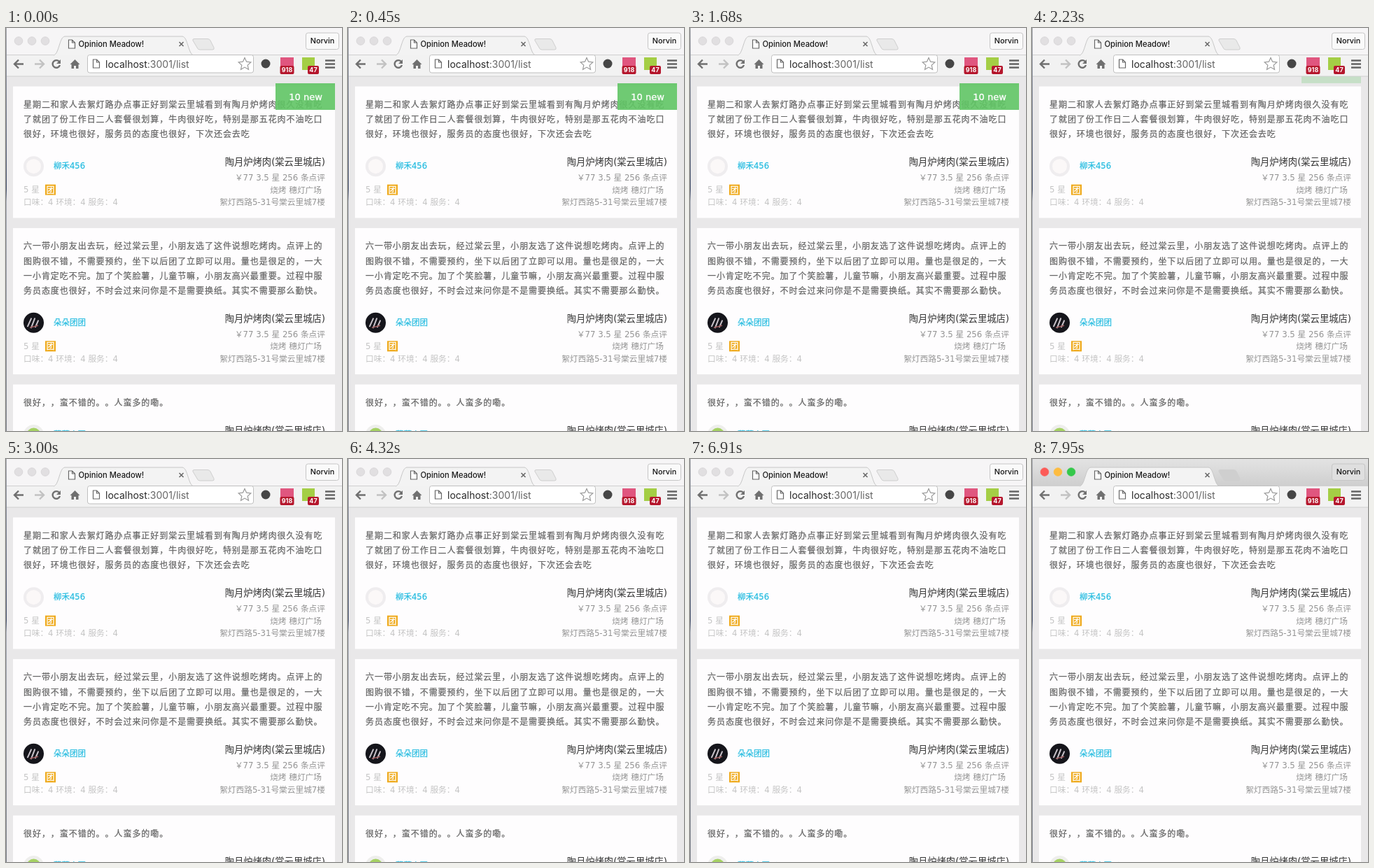
Recreate the animation shown at these times as an HTML page. Size 480 px wide and 576 px high, loop 8 s.

```html
<!DOCTYPE html>
<html lang="zh-CN">
<head>
<meta charset="utf-8">
<style>
  html, body { margin: 0; height: 100%; overflow: hidden; background: #e9e8e9; }
  svg { display: block; width: 100vw; height: 100vh; }
  text {
    font-family: 'DejaVu Sans', 'Noto Sans CJK SC', sans-serif; white-space: pre;
    font-feature-settings: 'chws' 0, 'halt' 0; text-spacing-trim: space-all;
  }
  .ui text { font-family: Inter, 'Liberation Sans', sans-serif; }
  .body { letter-spacing: .95px; stroke: #666; stroke-width: .25; }
  .user { stroke: #25bce0; stroke-width: .25; }
  .icon { fill: none; stroke: #707070; stroke-width: 2.4; }
</style>
</head>
<body>
<svg id="stage" viewBox="0 0 480 576"></svg>
<script>
const LOOP = 8000, SLIDE_START = 2090, SLIDE_TIME = 300, FOCUS_AT = 7900;
const SHOP = '陶月炉烤肉(棠云里城店)';
const ADDRESS = '絮灯西路5-31号棠云里城7楼';

const rect = (x, y, w, h, fill, extra = '') =>
  `<rect x="${x}" y="${y}" width="${w}" height="${h}" fill="${fill}" ${extra}/>`;
const circle = (x, y, r, fill, extra = '') =>
  `<circle cx="${x}" cy="${y}" r="${r}" fill="${fill}" ${extra}/>`;
const path = (d, extra) => `<path d="${d}" ${extra}/>`;
// Text is placed by the vertical centre of its line.
const text = (x, cy, size, fill, str, extra = '') =>
  `<text x="${x}" y="${cy + size * .37}" font-size="${size}" fill="${fill}" ${extra}>${str}</text>`;
const right = (x, cy, size, fill, str) => text(x, cy, size, fill, str, 'text-anchor="end"');

const avatars = {
  pale: y => circle(39.5, y, 14.5, '#efedef') + circle(39.5, y, 10.5, '#fbf8f8'),
  dark: y => circle(39.5, y, 14.5, '#15151b') +
    path(`M31 ${y + 5}l5-11M36 ${y + 7}l5-13M42 ${y + 6}l4-9`,
      'stroke="#c9c3ca" stroke-width="2" stroke-linecap="round"') +
    path(`M34 ${y + 7}l12-3`, 'stroke="#9a5557" stroke-width="1.5"'),
  green: y => circle(39.5, y, 14.5, '#eeeeec') + circle(39.5, y, 10, '#a5d163')
};

function card(top, height, lines, user, avatar) {
  const firstLine = top + 26, pitch = 21.1;
  const last = firstLine + (lines.length - 1) * pitch;
  return rect(10, top, 460, height, '#fefdfe') +
    lines.map((s, i) => text(25, firstLine + i * pitch, 12, '#666', s, 'class="body"')).join('') +
    avatars[avatar](last + 46) +
    text(68, last + 45.5, 11.5, '#25bce0', user, 'class="user"') +
    right(456, last + 39.5, 13.3, '#333', SHOP) +
    right(456, last + 62, 11.7, '#949494', '￥77 3.5 星 256 条点评') +
    right(451, last + 79.5, 11.7, '#949494', '烧烤 穗灯广场') +
    right(456, last + 97, 11.7, '#949494', ADDRESS) +
    text(25, last + 79, 11.7, '#c4c4c4', '5 星') +
    rect(56, last + 72, 15, 15, '#efaa1c') +
    text(57.5, last + 79.5, 12, '#fff', '团', 'stroke="#fff" stroke-width=".3"') +
    text(25, last + 97, 11.7, '#c4c4c4', '口味：4 环境：4 服务：4');
}

const cards =
  card(83.5, 188, [
    '星期二和家人去絮灯路办点事正好到棠云里城看到有陶月炉烤肉很久没有吃',
    '了就团了份工作日二人套餐很划算，牛肉很好吃，特别是那五花肉不油吃口',
    '很好，环境也很好，服务员的态度也很好，下次还会去吃'
  ], '柳禾456', 'pale') +
  card(286, 209, [
    '六一带小朋友出去玩，经过棠云里，小朋友选了这件说想吃烤肉。点评上的',
    '图购很不错，不需要预约，坐下以后团了立即可以用。量也是很足的，一大',
    '一小肯定吃不完。加了个笑脸薯，儿童节嘛，小朋友高兴最重要。过程中服',
    '务员态度也很好，不时会过来问你是不是需要换纸。其实不需要那么勤快。'
  ], '朵朵团团', 'dark') +
  card(509.5, 120, ['很好，，蛮不错的。。人蛮多的嘞。'], '蔓蔓小圆子', 'green');

const badge = `<g id="badge">${rect(385, 79, 85, 38, '#60c564')}
  ${text(428, 98, 13, '#fff', '10 new', 'text-anchor="middle" stroke="#fff" stroke-width=".3"')}</g>`;

const page = (x, y, w, h) =>
  path(`M${x} ${y}h${w - 4}l4 4v${h - 4}h${-w}zM${x + w - 4} ${y}v4h4`,
    'fill="#fff" stroke="#666" stroke-width="1.2"');
const counter = (x, w, n) => rect(x, 54, w, 12, '#b5172d', 'rx="2"') +
  text(x + w / 2, 60, 9, '#fff', n, 'text-anchor="middle" font-weight="700"');

const browser = `<g class="ui">
  <rect id="titlebar" width="480" height="39"/>
  ${rect(0, 38, 480, 31, '#f2f2f2')}
  ${path('M0 38.5H68M268 38.5H480', 'stroke="#d0d0d0"')}
  ${path('M0 69H480', 'stroke="#cfcfcf"')}
  ${path('M68 39C76 37 76 13 84 12H252C260 13 260 37 268 39', 'fill="#f3f3f3" stroke="#c6c6c6"')}
  <path id="newTab" d="M269 15.5H288Q291 15.5 292 18L297 28Q298 31 295 31H277Q274 31 273 28L267 18Q266 15.5 269 15.5Z" stroke="#cfcfcf"/>
  ${[18, 37, 56].map(x => circle(x, 18.5, 5.8, '', 'class="light" stroke-width=".8"')).join('')}
  ${page(89.5, 17, 9, 12)}
  ${text(103.5, 23, 11.2, '#1c1c1c', 'Opinion Meadow!', 'font-weight="500"')}
  ${path('M247.5 20l6 6M253.5 20l-6 6', 'stroke="#666" stroke-width="1.5"')}
  <rect id="profile" x="428.5" y="7" width="47" height="23.5" rx="3" stroke="#c6c6c6"/>
  ${text(452, 18.5, 10.8, '#111', 'Norvin', 'text-anchor="middle" font-weight="500"')}
  ${path('M25 51.5H12M18 45.5l-6 6 6 6', 'class="icon"')}
  ${path('M41 51.5H54M48 45.5l6 6-6 6', 'class="icon" style="stroke:#c2c2c2"')}
  ${path('M76 48A5.3 5.3 0 1 0 77 53', 'class="icon"')}
  ${path('M78 45v6h-6z', 'fill="#707070"')}
  ${path('M91.5 52L98.5 45l7 7h-2v6h-3.5v-4h-3v4h-3.5v-6z', 'fill="#707070"')}
  ${rect(116.5, 38.5, 237, 25.5, '#fff', 'rx="3" stroke="#bfbfbf"')}
  ${page(124.5, 45, 9, 12)}
  ${text(142, 51.5, 14, '#2a2a2a', 'localhost<tspan fill="#666">:3001/list</tspan>')}
  ${path('M341 42.5l2.6 5.7 6.2.7-4.6 4.2 1.3 6.1-5.5-3.1-5.5 3.1 1.3-6.1-4.6-4.2 6.2-.7z',
    'fill="#fff" stroke="#999" stroke-width="1.2"')}
  ${circle(371, 51, 6.5, '#464646')}
  ${rect(392, 42, 19, 19, '#e0567f')}${counter(391.5, 20, '918')}
  ${rect(423, 42, 18, 18, '#a4ce45')}${counter(431, 16, '47')}
  ${path('M456 46.5h14M456 51.5h14M456 56.5h14', 'stroke="#666" stroke-width="2.6"')}
</g>`;

const edge = `<linearGradient id="edge" x2="0" y2="1">
    <stop stop-color="#a5a7ad"/><stop offset=".4" stop-color="#3c4966"/>
    <stop offset=".43" stop-color="#a3a8b2"/><stop offset="1" stop-color="#777c86"/>
  </linearGradient>${rect(0, 0, 1, 576, 'url(#edge)')}
  <linearGradient id="activeBar" x2="0" y2="1">
    <stop stop-color="#e3e3e3"/><stop offset="1" stop-color="#cecece"/>
  </linearGradient>`;

const $ = id => document.getElementById(id);
$('stage').innerHTML = rect(0, 0, 480, 576, '#e9e8e9') + cards + badge + browser + edge;
const lights = document.querySelectorAll('.light');
const lightColors = ['#fc5b57', '#fdbc40', '#34c84a'];

function draw(t) {
  const p = Math.min(1, Math.max(0, (t - SLIDE_START) / SLIDE_TIME));
  const eased = 1 - (1 - p) ** 2;
  $('badge').setAttribute('transform', `translate(0 ${-53 * eased})`);
  $('badge').setAttribute('opacity', .9 * (1 - eased));

  const focused = t >= FOCUS_AT;
  $('titlebar').setAttribute('fill', focused ? 'url(#activeBar)' : '#f6f5f6');
  $('newTab').setAttribute('fill', focused ? '#cfcfcf' : '#e9e9e9');
  $('profile').setAttribute('fill', focused ? '#dfdfdf' : '#fafafa');
  lights.forEach((light, i) => {
    light.setAttribute('fill', focused ? lightColors[i] : '#e1dfe1');
    light.setAttribute('stroke', focused ? lightColors[i] : '#d3d1d3');
  });
}

const start = performance.now();
(function tick() {
  draw((performance.now() - start) % LOOP);
  requestAnimationFrame(tick);
})();
</script>
</body>
</html>
```
